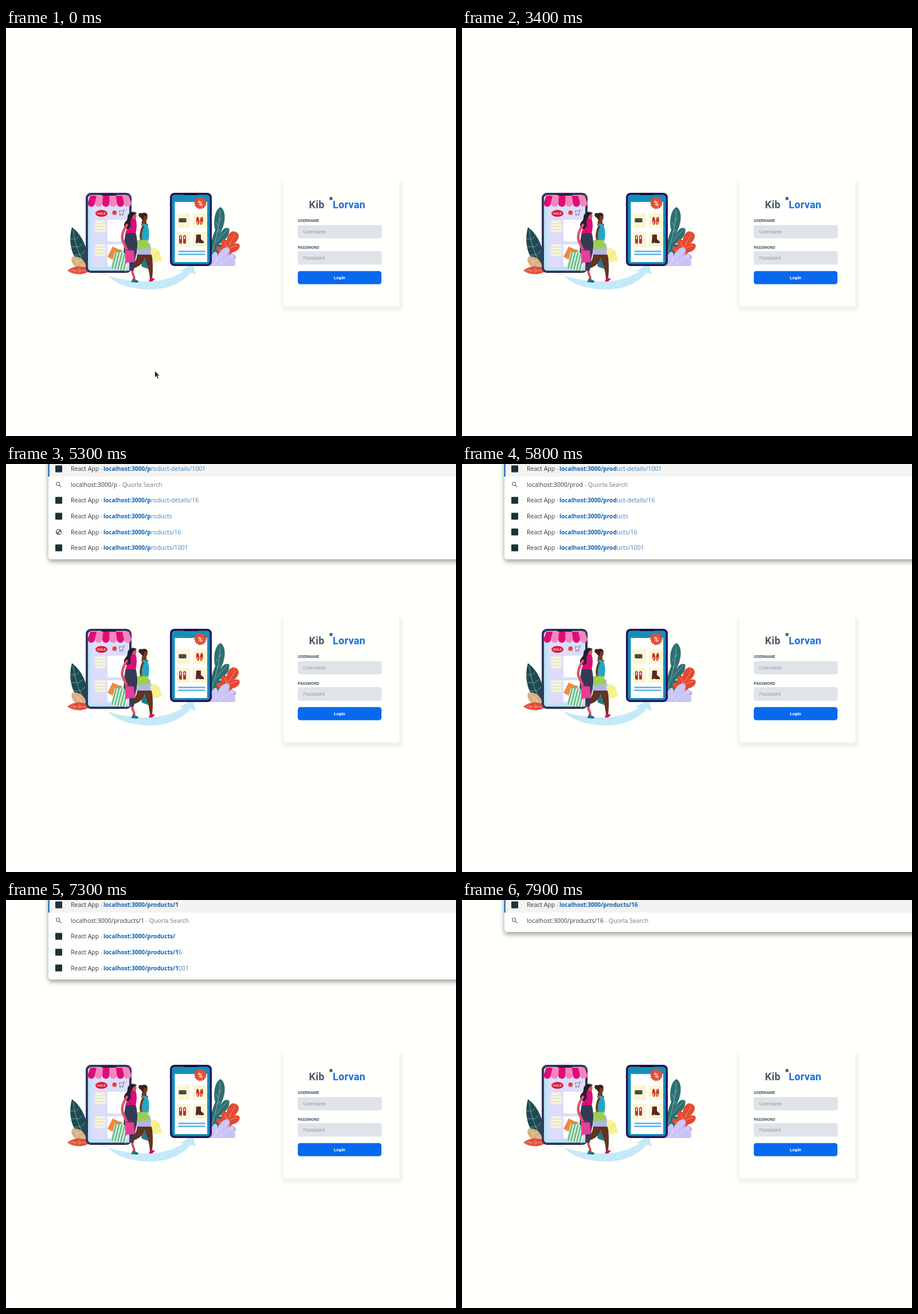
An HTML page for the animation above (8 s loop, 785 by 713 pixels).

```html
<!DOCTYPE html>
<html lang="en">
<head>
<meta charset="utf-8">
<title>Shop login</title>
<style>
html, body { margin: 0; width: 100%; height: 100%; overflow: hidden; background: #fffffb; }
svg { display: block; }
.ui { font-family: Roboto, sans-serif; font-weight: 700; }
.label { font-size: 7px; fill: #47566a; }
.hint { font: 8.5px "Liberation Sans", Arial, sans-serif; fill: #969da3; }
.name { font-size: 18px; letter-spacing: .25px; }
.row { font: 10.5px "Open Sans", "Noto Sans", sans-serif; fill: #34383c; }
.row .dim { fill: #74787b; }
.row .rest { fill: #3d85c4; }
.row .hit { font-weight: 700; font-size: 10.15px; fill: #1263b0; }
.panel { filter: drop-shadow(0 4px 4px rgba(50, 65, 55, .5)); }
.vein { fill: none; stroke: #fff; stroke-width: .5; stroke-linecap: round; opacity: .85; }
.limb { fill: none; stroke-linecap: round; stroke-linejoin: round; }
</style>
</head>
<body>
<svg id="stage" width="785" height="713" viewBox="0 0 785 713">
  <defs>
    <filter id="soft" x="-20%" y="-20%" width="140%" height="140%"><feGaussianBlur stdDeviation="3"/></filter>
    <pattern id="stripes" width="5" height="8" patternUnits="userSpaceOnUse" patternTransform="rotate(14)">
      <rect width="5" height="8" fill="#e9f7e2"/><rect width="2.7" height="8" fill="#63b78c"/>
    </pattern>
    <pattern id="dots" width="3.4" height="3.4" patternUnits="userSpaceOnUse">
      <rect width="3.4" height="3.4" fill="#2b3850"/><circle cx="1.2" cy="1.2" r=".6" fill="#b64f78"/>
    </pattern>
  </defs>

  <!-- plants -->
  <path fill="#1d4b53" d="M141 423C116 408 107 377 115 348C135 363 147 392 141 423Z"/>
  <path class="vein" d="M117 353Q123 393 139 416M119 368l-6 1M120 370l7-6M123 382l-9 0M124 384l10-7M128 396l-10 1M129 397l9-7M133 406l-9 1"/>
  <path fill="#d7b083" d="M142 426C124 424 111 412 115 400C129 396 141 408 142 426Z"/>
  <path class="vein" d="M117 402Q130 411 141 424M124 407l0 8M126 408l6-3M131 414l1 6"/>
  <path fill="#e64b35" d="M148 423C136 433 119 432 107 424C117 415 135 414 148 423Z"/>
  <path class="vein" d="M111 424H146M120 424l-4-3M121 424l-4 4M130 424l-4-5M130 424l-4 5"/>
  <path fill="#2d6f72" d="M357 405L357 380C359 369 361 363 365 353C361 338 364 318 374 313C384 318 384 339 375 356C374 361 372 363 371 367C376 352 382 347 389 350C392 361 381 373 371 378C377 378 381 380 382 385C374 394 366 399 357 405Z"/>
  <path class="vein" d="M374 319Q371 359 358 396M386 353Q375 362 367 374M372 337l5-5M370 345l-4-5M368 356l6-4"/>
  <path fill="#e44a30" d="M367 409C363 398 367 393 373 393C363 388 366 379 376 383C374 372 378 366 385 371C386 360 394 353 400 356C410 360 406 371 398 377C408 374 411 382 404 388C398 393 393 391 394 395C403 396 403 405 393 407Z"/>
  <path class="vein" d="M400 361Q390 379 371 407M382 375l4 11M372 387l8 6M403 380Q393 382 386 387M397 400l-16-3"/>
  <path fill="#c9c4f8" d="M354 416C356 405 358 393 365 391C369 391 369 396 369 399C373 388 383 381 388 384C393 389 389 395 384 399C394 391 402 394 399 402C400 409 401 413 399 416Z"/>
  <path class="vein" d="M386 387Q373 402 360 415M366 394l1 13M397 398Q382 405 370 414"/>

  <!-- swoosh -->
  <path fill="#c5e9f8" d="M160 425C180 435 206 442 237 443C267 444 291 437 309 426L304 424L326 412L331 431L322 428C305 447 281 457 251 457C211 456 188 445 175 430Z"/>

  <!-- shop phone -->
  <rect x="139" y="288" width="80" height="140" rx="9" fill="#38365b"/>
  <rect x="143" y="292" width="72" height="132" rx="6" fill="#dcddfb"/>
  <path fill="#b7e3f6" d="M143 300h5v118h67v6h-66q-6 0-6-6z"/>
  <path fill="#fdfdff" d="M177 335h34v38h-34zM177 378h34v38h-34z"/>
  <g id="awning"></g>
  <path stroke="#fbf7c8" stroke-width="3.600" d="M155 338.500h19M155 344h19M155 349.500h19M155 355h19M155 380h19M155 385.500h19M155 391h19M155 396.500h19"/>
  <rect x="166" y="289" width="27" height="4" rx="2" fill="#25234a"/>
  <ellipse cx="166.500" cy="324" rx="10.500" ry="6" fill="#df1837"/>
  <text x="166.500" y="326.200" text-anchor="middle" fill="#fff" font-family="Liberation Serif, serif" font-weight="700" font-size="6">SALE</text>
  <circle cx="189.300" cy="322.700" r="3.900" fill="#e2453f"/>
  <path fill="none" stroke="#55547a" stroke-width=".7" d="M208 317.500h-2l-2.300 7.500h-5l-1.700-5.500h8"/>
  <path fill="#55547a" d="M198 327a.9.9 0 1 0 1.800 0a.9.9 0 1 0-1.800 0M202.500 327a.9.9 0 1 0 1.800 0a.9.9 0 1 0-1.800 0"/>

  <!-- product phone -->
  <rect x="286" y="288" width="73" height="128" rx="8" fill="#24175a"/>
  <rect x="289.500" y="291.500" width="66" height="121" rx="5" fill="#158fb8"/>
  <rect x="310" y="288" width="25" height="4" rx="2" fill="#180d42"/>
  <rect x="294.500" y="304" width="56.500" height="105" fill="#fff"/>
  <path fill="#fbf6cd" d="M298 324h23v25h-23zM326 324h24v25h-24zM298 357h23v25h-23zM326 357h24v25h-24z"/>
  <rect x="301.500" y="332.500" width="13" height="7" rx="1" fill="#3b3638"/>
  <path stroke="#82766d" d="M302 335.500h12"/>
  <g fill="#c9372c"><ellipse cx="334.500" cy="337" rx="2.700" ry="7" transform="rotate(-5 334 337)"/><ellipse cx="341" cy="337" rx="2.700" ry="7" transform="rotate(5 341 337)"/></g>
  <path stroke="#f3be7c" stroke-width="1.700" d="M334 338v4M341 338v4"/>
  <g fill="#af3145"><rect x="302" y="362" width="5" height="15" rx="2.500"/><rect x="309" y="362" width="5" height="15" rx="2.500"/></g>
  <path stroke="#f4dcdc" stroke-width="2" d="M304.500 364v5M311.500 364v5"/>
  <path fill="#58262b" d="M332 361h8v8l5 4v3h-8l-2-2v2h-4z"/>
  <path stroke="#71bce5" stroke-width="2.800" d="M300.500 390.500h47M300.500 395.500h47"/>
  <polygon id="badge" fill="#e64d35"/>
  <text x="339" y="310.500" text-anchor="middle" fill="#fff" font-family="Roboto, sans-serif" font-size="13" font-weight="500" font-style="italic">%</text>

  <!-- right shopper -->
  <path fill="#207d8c" d="M234 402l12 2 2 17-11-4z"/>
  <path fill="#633421" d="M229 391L254 391C256 408 257 418 255 437L251 437C250 423 246 413 242 402C239 411 233 417 222 420L219 415C227 408 229 401 229 391Z"/>
  <path fill="#d0175e" d="M249 443q2-3 2-7l4 1 5 1-5 5z"/>
  <path fill="#763a20" d="M238 331L245 333L245 341L249 345L236 345Z"/>
  <ellipse cx="242.500" cy="330.500" rx="4.500" ry="6.500" fill="#763a20"/>
  <path fill="#3c211d" d="M246 325C241 320 233 324 235 332L239 336L241 329L247 328Z"/>
  <circle cx="235" cy="327" r="3.700" fill="#3c211d"/>
  <path fill="#22a6c5" d="M238 342L246 343C250 351 251 360 248 373L236 374C235 365 238 355 238 342Z"/>
  <path class="limb" stroke="#763a20" stroke-width="3.800" d="M239 347Q233 360 236 372L246 380"/>
  <path fill="#aeb4e8" d="M230 380L251 376L256 396L228 396Z"/>
  <path fill="#9cce56" d="M229 371l18-1 4 15-22 2z"/>
  <path fill="none" stroke="#6ca33c" d="M233 372q4-9 10-1"/>
  <path fill="#f4f18e" d="M251 388l16 0 5 18-14 4z"/>
  <path fill="none" stroke="#dac966" d="M254 388q3-6 8 0"/>

  <!-- left shopper -->
  <path class="limb" stroke="#dd4d5d" stroke-width="4" d="M216 400Q217 420 224 437"/>
  <path fill="url(#dots)" d="M209 357L226 357C230 371 230 386 226 401L223 424L218 424L214 404L209 413L204 409C206 395 205 371 209 357Z"/>
  <path fill="#23717f" d="M218 444q3-4 3-7l4 2 6 3-1 3z"/>
  <path fill="#df5265" d="M217 327L226 328L226 337L219 340L214 338Z"/>
  <ellipse cx="223" cy="329" rx="4.500" ry="6.500" fill="#df5265"/>
  <path fill="#dc0c78" d="M213 334L226 333Q230 344 226 359L208 359Q214 345 213 334Z"/>
  <path fill="#241f31" d="M228 324C222 318 212 323 212 331C212 338 206 338 206 345C206 350 211 353 215 350C221 344 214 341 219 334L222 327Z"/>
  <path class="limb" stroke="#df5265" stroke-width="4.500" d="M211 344Q201 358 203 370L210 386"/>
  <path fill="#ef8a3c" d="M186 382l16 7-8 20-17-9z"/>
  <path fill="url(#stripes)" d="M190 391l19 2 1 32-28-5z"/>
  <path fill="none" stroke="#5a9d79" d="M194 392q6-9 12 1"/>
  <path fill="#ea3c96" d="M208 388l15 1 2 20-17 1z"/>
  <path fill="none" stroke="#a92369" d="M211 389q4-8 9 0"/>

  <!-- login card -->
  <rect x="481" y="268" width="210" height="226" rx="3" fill="#5d656c" opacity=".09" filter="url(#soft)"/>
  <rect x="484" y="257" width="202" height="229" rx="3" fill="#fffffc"/>
  <g class="ui">
    <text class="name" x="528.500" y="315" fill="#4b596c">Kib</text>
    <text class="name" x="570" y="315" fill="#176fdc">Lorvan</text>
    <rect x="564.500" y="295.500" width="5" height="5" fill="#4b596c"/>
    <text class="label" x="509" y="338.700">USERNAME</text>
    <text class="label" x="509" y="385.500">PASSWORD</text>
    <rect x="509" y="344.500" width="146.500" height="23" rx="2" fill="#dee4e8"/>
    <rect x="509" y="390" width="146.500" height="23.500" rx="2" fill="#dee4e8"/>
    <text class="hint" x="518.500" y="359">Username</text>
    <text class="hint" x="518.500" y="404.700">Password</text>
    <rect x="509" y="424.700" width="146" height="23" rx="4.500" fill="#0869ee"/>
    <text x="582" y="439.300" font-size="8" fill="#fff" text-anchor="middle">Login</text>
  </g>

  <g id="menu"></g>
  <path id="cursor" d="M0 0V12L2.800 9.500L4.800 14L6.900 13L4.900 8.800H8.600Z" fill="#25272b" stroke="#fff" stroke-width=".7"/>
</svg>
<script>
const $ = id => document.getElementById(id);
const LOOP = 8000, PITCH = 27.6, HOST = 'localhost:3000/';

const many = (n, f) => Array.from({ length: n }, (_, i) => f(i));

$('awning').innerHTML = many(6, i => {
  const top = 147 + i * 11.2, x = 142.5 + i * 12.7;
  return `<path fill="${i % 2 ? '#f486bd' : '#de0d76'}" d="M${top} 293h11.200L${x + 12.7} 306a6.350 6.500 0 0 1-12.700 0z"/>`;
}).join('');

$('badge').setAttribute('points', many(28, i => {
  const r = i % 2 ? 9 : 11.5, a = i * Math.PI / 14;
  return [339 + r * Math.cos(a), 306 + r * Math.sin(a)].map(v => v.toFixed(1));
}).join(' '));

// [time, x, y] of the pointer tip
const pointer = [
  [0, 259.5, 599], [900, 271, 581], [2400, 271, 580], [2500, 269, 544], [2600, 260, 424],
  [2700, 244, 272], [2800, 228, 140], [2900, 210, 65], [3100, 186, -13], [3400, 186, -40]
];

const d1 = 'product-details/1001', d16 = 'product-details/16';
const p = 'products', p16 = 'products/16', p1001 = 'products/1001';
const all = [d1, d16, p, p16, p1001];

// [time, typed path, suggestions]
const typing = [
  [0, '', []],
  [5000, '', ['', d1, ...all.slice(1)]],
  [5300, 'p', all], [5400, 'pr', all], [5600, 'pro', all], [5800, 'prod', all],
  [6100, 'produ', all], [6300, 'produc', all], [6500, 'product', all],
  [6600, 'products', [p, 'products/', p16, p1001]],
  [7100, 'products/', ['products/', p, p16, p1001]],
  [7300, 'products/1', ['products/1', 'products/', p16, p1001]],
  [7400, 'products/1', ['products/1', p16, p1001]],
  [7600, 'products/16', [p16, p16, p1001]],
  [7900, 'products/16', [p16]]
];

const stepAt = (table, t) => table.filter(s => s[0] <= t).length - 1;

function shared(a, b) {
  let n = 0;
  while (n < a.length && a[n] === b[n]) n++;
  return n;
}

function globe(y) {
  return `<circle cx="92" cy="${y}" r="5.200" fill="#666b6d"/>
    <path fill="#fff" d="M88 ${y - 2}l4-2 1 2-3 3zM92 ${y + 1}l4-2-1 4-3 1z"/>`;
}

function suggestion(path, typed, y, loading) {
  const n = shared(path, typed);
  const icon = loading ? globe(y) : `<rect x="86" y="${y - 6}" width="12" height="12" rx="1" fill="#1d3139"/>`;
  return `${icon}<text class="row" x="113" y="${y + 3.7}">React App<tspan class="dim"> -</tspan>` +
    `<tspan class="hit" x="170">${HOST + path.slice(0, n)}</tspan><tspan class="rest">${path.slice(n)}</tspan></text>`;
}

function search(typed, y) {
  return `<path fill="none" stroke="#74787b" stroke-width="1.300" d="M87.700 ${y - 1.3}a3 3 0 1 0 6 0a3 3 0 1 0-6 0M93 ${y + 1}l3.500 3.500"/>` +
    `<text class="row" x="113" y="${y + 3.7}">${HOST + typed}<tspan class="dim"> - Quorla Search</tspan></text>`;
}

function menu([time, typed, paths]) {
  if (!paths.length) return '';
  const bottom = 28.5 + PITCH * paths.length;
  const rows = paths.map((path, i) =>
    suggestion(path, typed, 8.4 + PITCH * (i && i + 1), time === 5300 && path === p16));
  return `<rect ${time > 5000 ? 'class="panel"' : ''} x="74" y="-20" width="750" height="${bottom + 20}" rx="5" fill="#fffffd"/>
    <rect x="74" y="0" width="711" height="22" fill="#f3f3f2"/>
    <rect x="73.500" y="0" width="2.300" height="22" fill="#176bbd"/>` +
    rows.join('') + search(typed, 36);
}

const start = performance.now();
let shown = -1;

function draw() {
  const t = (performance.now() - start) % LOOP;
  const [, x, y] = pointer[stepAt(pointer, t)];
  $('cursor').setAttribute('transform', `translate(${x} ${y})`);
  const step = stepAt(typing, t);
  if (step !== shown) {
    shown = step;
    $('menu').innerHTML = menu(typing[step]);
  }
  requestAnimationFrame(draw);
}
draw();
</script>
</body>
</html>
```
